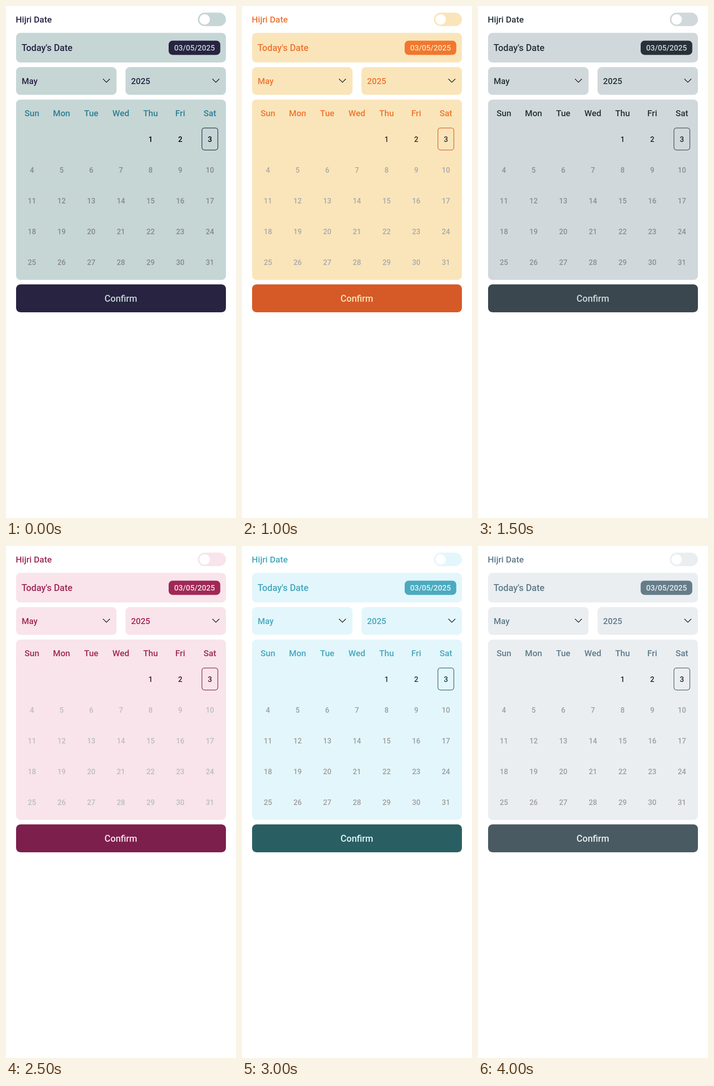
An HTML page with a canvas that plays this animation: 502x1115 px, repeating every 4.5 s.

```html
<!DOCTYPE html>
<html lang="en">
<head>
<meta charset="utf-8">
<title>Calendar themes</title>
<style>
  html, body { margin: 0; width: 100%; height: 100%; overflow: hidden; background: #fff; }
  canvas { display: block; width: 502px; height: 1115px; }
</style>
</head>
<body>
<canvas id="stage"></canvas>
<script>
const WIDTH = 502, HEIGHT = 1115, STEP = 500;
const canvas = document.getElementById('stage');
const ctx = canvas.getContext('2d');
const ratio = window.devicePixelRatio || 1;
canvas.width = WIDTH * ratio;
canvas.height = HEIGHT * ratio;
ctx.scale(ratio, ratio);

const theme = (surface, text, weekday, pill, button, day, muted, outline = button) =>
  ({ surface, text, weekday, pill, button, day, muted, outline });

const themes = [
  theme('#c5d6d5', '#272343', '#2f7f92', '#272341', '#272341', '#000000', '#878a8a'),
  theme('#c8e6c9', '#2e7d32', '#2e7d32', '#2e7d32', '#1b5e20', '#17301a', '#939393'),
  theme('#fae5ba', '#f07430', '#f07430', '#f2762e', '#d65a27', '#3e2723', '#a9a9a9'),
  theme('#d0d8db', '#263238', '#263238', '#283138', '#3b474f', '#212121', '#8e8e8e'),
  theme('#ede7f6', '#5e35b1', '#5e35b1', '#5e35b1', '#4527a0', '#25154f', '#a9a9a9'),
  theme('#f8e4ea', '#a02856', '#a02856', '#a02856', '#7c1f4d', '#4a0d28', '#bdbdbd'),
  theme('#e3f6fb', '#45a8bd', '#45a8bd', '#4aaabf', '#295f62', '#0f3d40', '#9e9e9e'),
  theme('#fff3e0', '#ef7d22', '#ef7d22', '#ef7d22', '#d9601a', '#3e2723', '#a9a9a9'),
  theme('#eaeef1', '#5f7b89', '#5f7b89', '#657d89', '#4a5a62', '#212121', '#9e9e9e', '#455a64')
];

const weekdays = ['Sun', 'Mon', 'Tue', 'Wed', 'Thu', 'Fri', 'Sat'];
const columnX = column => 56.5 + column * 64.75;

function box(x, y, w, h, radius, color) {
  ctx.beginPath();
  ctx.roundRect(x, y, w, h, radius);
  ctx.fillStyle = color;
  ctx.fill();
}

function label(text, x, middle, size, color, align = 'left') {
  ctx.font = `500 ${size}px Roboto, sans-serif`;
  ctx.textAlign = align;
  ctx.fillStyle = color;
  ctx.fillText(text, x, middle + size * 0.355);
}

function chevron(x, y) {
  ctx.beginPath();
  ctx.moveTo(x - 7.5, y - 3.7);
  ctx.lineTo(x, y + 3.7);
  ctx.lineTo(x + 7.5, y - 3.7);
  ctx.strokeStyle = '#000';
  ctx.lineWidth = 1.3;
  ctx.stroke();
}

function dropdown(text, x, colors) {
  box(x, 133, 219.2, 60.5, 9.5, colors.surface);
  label(text, x + 12.3, 163.5, 18.3, colors.text);
  chevron(x + 197.2, 162.5);
}

function drawHeader(colors) {
  label('Hijri Date', 21.3, 29.5, 19, colors.text);
  box(418.8, 14.6, 61.2, 29.2, 14.6, colors.surface);
  box(422.2, 18, 22.6, 22.6, 11.3, '#fff');

  box(22, 58.5, 458, 64.6, 9.5, colors.surface);
  label("Today's Date", 34, 91.3, 19.8, colors.text);
  box(355, 75.5, 112.7, 31, 8.5, colors.pill);
  label('03/05/2025', 411.5, 91.3, 16.7, colors.surface, 'center');
}

function drawCalendar(colors) {
  box(22, 203.8, 458, 392.7, 9.5, colors.surface);
  weekdays.forEach((name, i) => label(name, columnX(i), 233.5, 18.7, colors.weekday, 'center'));

  const firstColumn = 4, today = 3;
  for (let day = 1; day <= 31; day++) {
    const cell = day + firstColumn - 1;
    const x = columnX(cell % 7);
    const y = 290.6 + Math.floor(cell / 7) * 66.85;
    label(day, x, y, 16, day <= today ? colors.day : colors.muted, 'center');
    if (day === today) {
      ctx.beginPath();
      ctx.roundRect(x - 17.4, y - 25.1, 34.8, 48, 5.5);
      ctx.strokeStyle = colors.outline;
      ctx.lineWidth = 1.25;
      ctx.stroke();
    }
  }
}

function draw(colors) {
  ctx.fillStyle = '#fff';
  ctx.fillRect(0, 0, WIDTH, HEIGHT);
  drawHeader(colors);
  dropdown('May', 22, colors);
  dropdown('2025', 260.8, colors);
  drawCalendar(colors);
  box(22, 606.2, 458, 60.8, 9.5, colors.button);
  label('Confirm', 250.7, 637, 19.9, colors.surface, 'center');
}

const start = performance.now();
function tick(now) {
  const elapsed = Math.max(0, now - start);
  draw(themes[Math.floor(elapsed / STEP) % themes.length]);
  requestAnimationFrame(tick);
}
tick(start);
</script>
</body>
</html>
```
